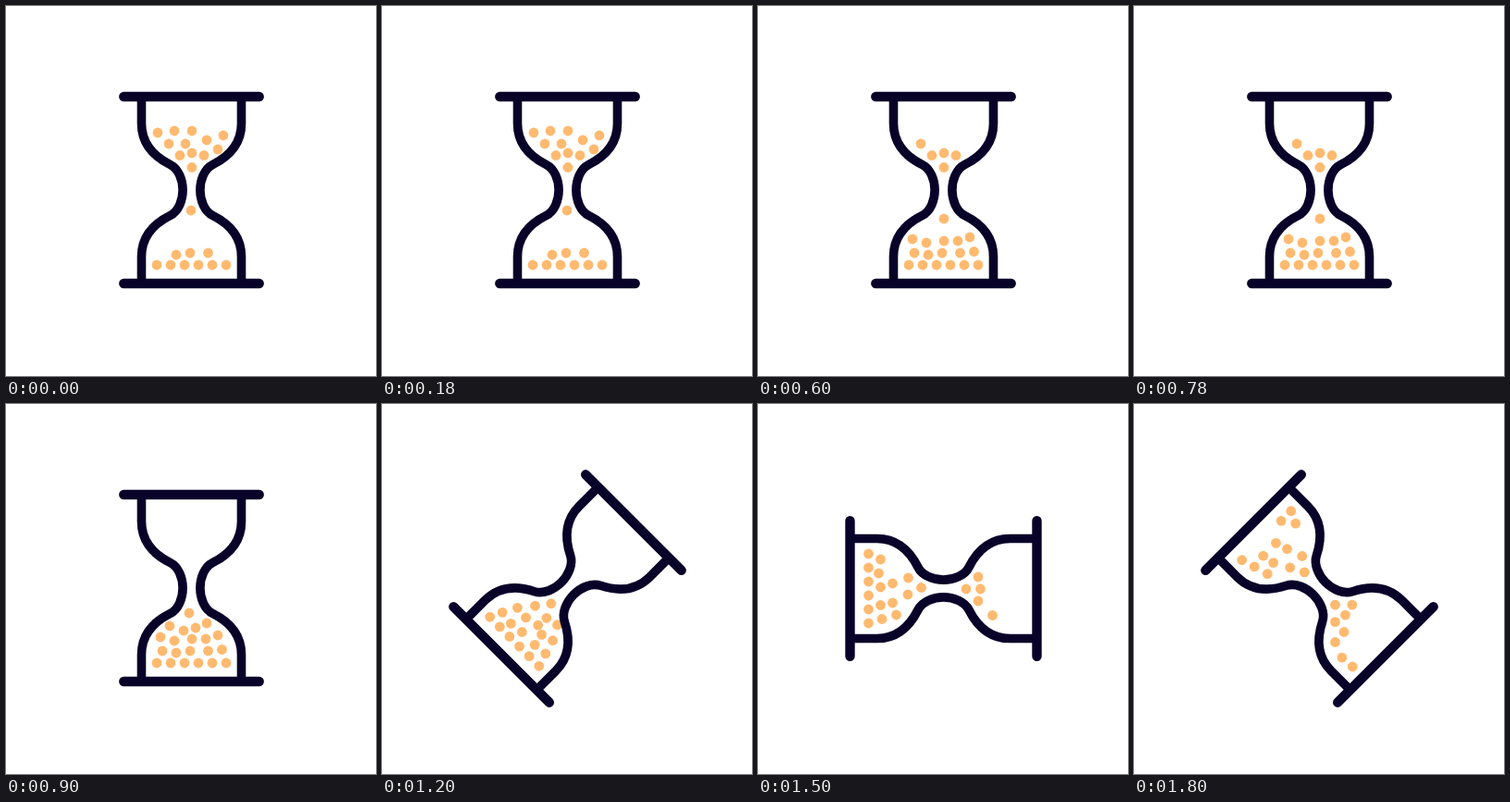
Animation, 400 px wide and 400 px high, one loop 2.1 s. Source, as an HTML page:

```html
<!DOCTYPE html>
<html lang="en">
<head>
<meta charset="utf-8">
<title>Hourglass</title>
<style>
  html, body { margin: 0; width: 100%; height: 100%; overflow: hidden; background: #fff; }
  svg { display: block; width: 100%; height: 100%; }
  .glass { fill: none; stroke: #080229; stroke-width: 9.6; }
  .cap { stroke: #080229; stroke-width: 10.4; stroke-linecap: round; }
  .sand { fill: #ffba70; }
</style>
</head>
<body>
<svg viewBox="0 0 400 400">
  <g id="hourglass">
    <g id="sand" class="sand"></g>
    <g class="glass">
      <path id="wall" d="M-54-101V-72C-54-51-42-37-23-27.5C-14-23-9.4-11-9.4 0C-9.4 11-14 23-23 27.5C-42 37-54 51-54 72V101"/>
      <use href="#wall" transform="scale(-1 1)"/>
    </g>
    <path class="cap" d="M-73.2-101H73.2M-73.2 101H73.2"/>
  </g>
</svg>
<script>
  const STEP_MS = 300;
  const STEPS = 7;
  const FIRST_TURN = 4;

  // Each key lists the steps in which its grains are visible.
  const grains = {
    '0123456': [[163, 280], [178, 280], [238, 280], [199, 267], [218.5, 267]],
    '012345': [[193, 280], [208, 280], [223, 280], [184, 269]],
    '123456': [[233.5, 265.5]],
    '23456': [[169, 267], [216, 254], [229, 250]],
    '23': [[167, 252], [182, 256], [201, 254]],
    '3': [[198, 226], [177, 240], [217, 237], [205, 242], [192, 245]],
    '4': [[177, 252], [191, 253], [206, 249.5], [220.5, 234.5]],
    '456': [[189, 237], [207, 237.5], [199.5, 223]],
    '56': [[195, 254], [229.5, 146]],
    '6': [[215, 147], [236, 129], [235, 114]],
    '01256': [[188, 161.5], [214, 161.5]],
    '0256': [[201, 159], [201, 174.5]],
    '012': [[176, 149]],
    '01': [[164, 137], [235, 140], [229, 155]],
    '0': [[182, 135], [201, 135], [194, 149], [217, 145], [200, 221]],
    '1': [[188, 144], [201, 154], [202, 177], [200, 238], [201, 252], [171, 263]],
    '2': [[201, 230]]
  };

  const hourglass = document.getElementById('hourglass');
  const sand = document.getElementById('sand');

  const groups = Object.entries(grains).map(([steps, points]) => {
    const group = document.createElementNS('http://www.w3.org/2000/svg', 'g');
    group.innerHTML = points
      .map(([x, y]) => `<circle cx="${x - 200.5}" cy="${y - 199}" r="5.4"/>`)
      .join('');
    sand.append(group);
    return { steps, group };
  });

  function render(time) {
    const step = Math.floor(time / STEP_MS) % STEPS;
    const angle = Math.max(0, step - FIRST_TURN + 1) * 45;
    const centerY = angle ? 199.5 : 199;
    hourglass.setAttribute('transform', `translate(200.5 ${centerY}) rotate(${angle})`);
    for (const { steps, group } of groups) {
      group.style.display = steps.includes(step) ? '' : 'none';
    }
  }

  const start = performance.now();
  function tick() {
    render(performance.now() - start);
    requestAnimationFrame(tick);
  }
  tick();
</script>
</body>
</html>
```
